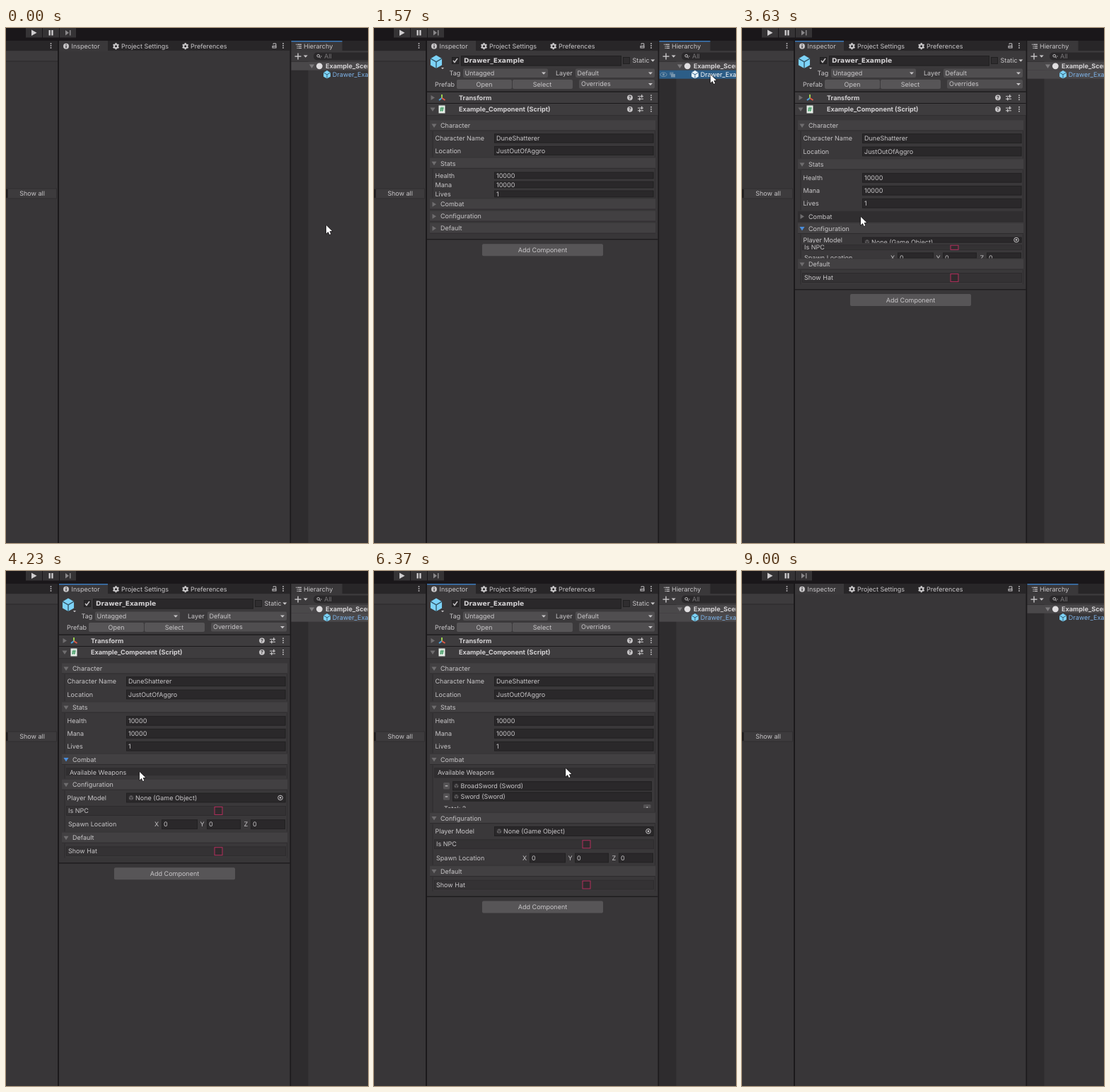
Animation, 512 px wide and 728 px high, one loop 9.43 s. Source, as an HTML page with a canvas:

```html
<!DOCTYPE html>
<html lang="en">
<head>
<meta charset="utf-8">
<title>Inspector foldouts</title>
<style>
html, body { margin: 0; width: 100%; height: 100%; overflow: hidden; background: #383638; }
canvas { display: block; width: 512px; height: 728px; }
</style>
</head>
<body>
<canvas id="stage"></canvas>
<script>
const LOOP = 9430, W = 512, H = 728;
const canvas = document.getElementById('stage');
const ctx = canvas.getContext('2d');
const dpr = window.devicePixelRatio || 1;
canvas.width = W * dpr;
canvas.height = H * dpr;

const C = {
  bg: '#383638', bar: '#1a171a', tabs: '#282628', line: '#1b191b', field: '#2a282a',
  edge: '#212021', head: '#424042', hover: '#302e30', popup: '#504e50', button: '#575557',
  text: '#c8c6c8', dim: '#8a888a', blue: '#3a79bb', select: '#2c5d87', pink: '#b5305f',
  cube: '#7dd3f8'
};
const REG = '9px Inter, sans-serif';
const BOLD = 'bold 9.1px Inter, sans-serif';
const NAME = 'bold 9.1px "DejaVu Sans", sans-serif';

// Moments of the clicks
const T = { pick: 930, show: 1000, def: 2850, config: 3350, combat: 3900, list: 4870, unlist: 6250, clear: 7560, hide: 8170 };

const PATH = [
  [0, 453, 279], [60, 453, 279], [900, 476, 66], [2000, 476, 66], [2750, 140, 299],
  [2930, 140, 299], [3260, 150, 283], [3420, 150, 283], [3600, 168, 267], [3900, 169, 268],
  [4230, 189, 284], [4640, 200, 285], [4900, 200, 285], [5470, 305, 290], [5670, 271, 285],
  [5890, 271, 285], [6070, 271, 279], [6350, 271, 279], [6930, 326, 260], [7190, 433, 167],
  [7480, 493, 157], [7960, 493, 157], [8150, 479, 145]
];

const clamp = v => Math.max(0, Math.min(1, v));
const ease = v => (1 - Math.cos(Math.PI * clamp(v))) / 2;
const ramp = (t, from, len) => ease((t - from) / len);

function cursorAt(t) {
  const i = PATH.findIndex(p => p[0] > t);
  if (i < 0) return PATH[PATH.length - 1].slice(1);
  const [a, ax, ay] = PATH[i - 1], [b, bx, by] = PATH[i];
  const k = ease((t - a) / (b - a));
  return [ax + (bx - ax) * k, ay + (by - ay) * k];
}

function box(x, y, w, h, fill, stroke) {
  ctx.fillStyle = fill;
  ctx.fillRect(x, y, w, h);
  if (stroke) {
    ctx.strokeStyle = stroke;
    ctx.lineWidth = 1;
    ctx.strokeRect(x + .5, y + .5, w - 1, h - 1);
  }
}

function rounded(x, y, w, h, r, fill) {
  ctx.fillStyle = fill;
  ctx.beginPath();
  ctx.roundRect(x, y, w, h, r);
  ctx.fill();
}

function label(s, x, cy, color = C.text, font = REG, align = 'left') {
  ctx.font = font;
  ctx.fillStyle = color;
  ctx.textAlign = align;
  ctx.fillText(s, x, cy + 3.2);
}

function poly(points, fill) {
  ctx.fillStyle = fill;
  ctx.beginPath();
  points.forEach(([x, y]) => ctx.lineTo(x, y));
  ctx.closePath();
  ctx.fill();
}

function path(points, color, width = 1) {
  ctx.strokeStyle = color;
  ctx.lineWidth = width;
  ctx.beginPath();
  points.forEach(([x, y]) => ctx.lineTo(x, y));
  ctx.stroke();
}

function disc(x, y, r, fill) {
  ctx.fillStyle = fill;
  ctx.beginPath();
  ctx.arc(x, y, r, 0, 7);
  ctx.fill();
}

function ring(x, y, r, color, width = 1) {
  ctx.strokeStyle = color;
  ctx.lineWidth = width;
  ctx.beginPath();
  ctx.arc(x, y, r, 0, 7);
  ctx.stroke();
}

function clipped(x, y, w, h, draw) {
  if (h <= 0) return;
  ctx.save();
  ctx.beginPath();
  ctx.rect(x, y, w, h);
  ctx.clip();
  draw();
  ctx.restore();
}

const caret = (x, y, c = C.text, r = 3) => poly([[x - r, y - r / 2], [x + r, y - r / 2], [x, y + r / 2 + .3]], c);
const dots = (x, y) => [-3, 0, 3].forEach(d => box(x - .8, y + d - .8, 1.6, 1.6, C.text));

function arrow(x, y, open, color = '#6f6d6f') {
  poly(open ? [[x - 3.5, y - 2.5], [x + 3.5, y - 2.5], [x, y + 3]]
            : [[x - 2.5, y - 3.5], [x + 3, y], [x - 2.5, y + 3.5]], color);
}

function cube(x, y, r, fill, seam, width) {
  const hex = [0, 1, 2, 3, 4, 5].map(i => {
    const a = Math.PI / 3 * i - Math.PI / 2;
    return [x + r * Math.cos(a), y + r * Math.sin(a)];
  });
  poly(hex, fill);
  [1, 3, 5].forEach(i => path([[x, y], hex[i]], seam, width));
}

function gear(x, y) {
  for (let i = 0; i < 3; i++) {
    const a = Math.PI / 3 * i + Math.PI / 6, dx = 4.6 * Math.cos(a), dy = 4.6 * Math.sin(a);
    path([[x - dx, y - dy], [x + dx, y + dy]], C.text, 2.2);
  }
  disc(x, y, 3.5, C.text);
  disc(x, y, 1.5, C.tabs);
}

function tabLine(x, w) { box(x, 18, w, 1.5, C.blue); }

function drawTopAndLeft() {
  box(0, 0, W, 18, C.bar);
  [28, 52, 76].forEach(x => box(x, 0, 23, 13.5, '#353335'));
  poly([[36, 2.5], [43.5, 6.7], [36, 11]], '#d0ced0');
  box(60.5, 3, 2.3, 7.5, '#d0ced0');
  box(64.3, 3, 2.3, 7.5, '#d0ced0');
  poly([[84, 3], [89, 6.7], [84, 10.5]], C.dim);
  box(90, 3, 1.5, 7.5, C.dim);

  box(0, 18, 73, 14, C.tabs);
  dots(63.5, 25);
  box(0, 33, 73, 14, '#3d3b3d');
  box(0, 46.5, 73, 1, '#2a282a');
  box(0, 226.5, 72, 15, '#3d3b3d', '#2f2d2f');
  box(0, 228, 2.5, 12, C.line);
  label('Show all', 37, 233.5, C.text, REG, 'center');
  box(73, 18, 2, 710, C.line);
  box(401.5, 18, 2, 710, C.line);
}

function drawTabs(focus) {
  box(75, 18, 326.5, 14, C.tabs);
  box(75, 18, 69, 15, '#3a383a');
  if (focus) tabLine(75, 69);
  disc(85, 25.7, 4, C.text);
  box(84.4, 25, 1.3, 3.2, C.bg);
  box(84.4, 23, 1.3, 1.2, C.bg);
  label('Inspector', 92.5, 25.7);
  gear(155.5, 25.7);
  label('Project Settings', 163, 25.7);
  gear(253.7, 25.7);
  label('Preferences', 261, 25.7);
  box(376.5, 25, 6, 3.5, C.bg, C.text);
  path([[381.8, 25], [381.8, 22], [378, 22], [378, 23.3]], C.text);
  dots(392, 25);
}

function drawHierarchy(s) {
  const active = s.picked && !s.focus;
  const over = s.cx > 403 && s.cy >= 60 && s.cy < 72;
  box(403.5, 18, 109, 14, C.tabs);
  box(403.5, 18, 72, 15, '#3a383a');
  if (!s.focus) tabLine(403.5, 72);
  [22.7, 25.3, 27.9].forEach((y, i) => {
    box(410 + (i ? 1.5 : 0), y, 1.2, 1.2, C.text);
    box(412 + (i ? 1.5 : 0), y, i ? 4.5 : 6, 1.2, C.text);
  });
  label('Hierarchy', 421, 25.7);
  box(403.5, 33, 109, 14.5, '#3c3a3c');
  box(408.5, 39.4, 9, 1.4, C.text);
  box(412.3, 35.6, 1.4, 9, C.text);
  caret(423.7, 40);
  rounded(435, 34.5, 90, 11, 5, C.field);
  ring(441.7, 39.3, 1.8, C.text);
  path([[443, 40.6], [445, 42.4]], C.text);
  caret(445.8, 40.2, C.dim, 1.3);
  label('All', 450, 40, '#7b797b');
  box(403.5, 47.5, 24, 681, '#2e2c2e');
  box(403.5, 48, 109, 11.7, '#4a484a');
  if (s.picked) box(403.5, 59.7, 109, 12, active ? C.select : '#4a484a');
  else if (over) box(403.5, 59.7, 109, 12, '#434143');
  arrow(432.5, 54, true, '#7d7b7d');
  disc(443.3, 53.8, 4.4, '#e0dee0');
  label('Example_Scene', 452, 53.8, '#d4d2d4', BOLD);
  cube(454, 65.8, 5.7, active ? '#e8f4fb' : C.cube, active ? C.select : '#2f5468', .9);
  label('Drawer_Example', 461.8, 65.8, active ? '#fff' : '#7fb4ea');
  if (over) {
    const tone = '#7795ad';
    ctx.strokeStyle = tone;
    ctx.lineWidth = 1;
    ctx.beginPath();
    ctx.ellipse(409.5, 65.8, 4.5, 2.7, 0, 0, 7);
    ctx.stroke();
    disc(409.5, 65.8, 1.5, tone);
    box(420, 65, 6, 4.5, tone);
    [418.5, 420.3, 422.1].forEach(x => box(x, 62.5, 1.2, 4, tone));
  }
}

function popup(x, y, w, s, tx) {
  rounded(x, y, w, 12.5, 2, C.popup);
  label(s, tx, y + 6);
  caret(x + w - 6, y + 6.4);
}

function headTools(y) {
  disc(362, y, 3.9, C.text);
  label('?', 362, y - .6, C.bg, 'bold 7px Inter, sans-serif', 'center');
  box(373, y - 2.2, 8, 1, C.text);
  box(373, y + 1.5, 8, 1, C.text);
  box(378, y - 4, 1.4, 4.2, C.text);
  box(375, y - .2, 1.4, 4.2, C.text);
  dots(392, y);
}

function drawObjectHeader() {
  box(75, 33, 326.5, 56.5, '#3b393b');
  cube(88, 47.8, 9.3, C.cube, '#34586a', 1.4);
  caret(97, 57, C.text, 2);
  box(110, 41, 10, 10, C.field, C.edge);
  path([[112, 46], [114, 48.5], [118, 43]], C.text, 1.4);
  box(123, 39, 227, 14.5, C.field, C.edge);
  label('Drawer_Example', 127, 46, '#d4d2d4', NAME);
  box(352, 41, 10, 10, '#2f2d2f', C.edge);
  label('Static', 365.5, 46);
  caret(394.3, 46);
  label('Tag', 106.5, 63.5);
  popup(126, 57.5, 120, 'Untagged', 128.5);
  label('Layer', 257, 63.7);
  popup(285, 57.5, 112, 'Default', 287.5);
  label('Prefab', 86, 79.5);
  rounded(117, 73, 78, 13, 2, C.button);
  label('Open', 156, 79.5, C.text, REG, 'center');
  rounded(196, 73, 85, 13, 2, C.button);
  label('Select', 238, 79.5, C.text, REG, 'center');
  popup(290, 73, 107, 'Overrides', 293);

  box(75, 89.5, 326.5, 1.3, C.line);
  box(75, 91, 326.5, 15, '#3e3c3e');
  arrow(83, 98.5, false);
  path([[96, 99], [96, 94]], '#9ad04f', 2);
  path([[96, 99], [92, 102]], '#4aa3e0', 2);
  path([[96, 99], [100.5, 102]], '#e05a45', 2);
  label('Transform', 120, 98.5, '#d4d2d4', BOLD);
  headTools(98.3);
  box(75, 106, 326.5, 1, C.line);
  box(75, 107, 326.5, 16, '#3e3c3e');
  arrow(83, 115, true);
  box(91.5, 109.5, 9, 11, '#e4ece6');
  label('#', 96, 115, '#2f9255', 'bold 9px Inter, sans-serif', 'center');
  label('Example_Component (Script)', 120, 115, '#d4d2d4', BOLD);
  headTools(114.8);
  box(75, 123, 326.5, 1, '#302e30');
}

function check(cy, h) {
  const s = Math.max(0, Math.min(12, h));
  box(294.5, cy - s / 2, 12, s, '#302a2d', C.pink);
}

function darkRow(s, cy, h) {
  const on = Math.abs(s.cy - cy) < h / 2 && s.cx > 85 && s.cx < 396;
  box(85, cy - h / 2, 311, h, on ? C.hover : '#343234', '#2d2b2d');
}

// Rows receive the state, centre and height
const textRow = (name, value) => (s, cy, h) => {
  label(name, 86.5, cy);
  box(170, cy - h / 2, 225.5, h, C.field, C.edge);
  label(value, 173, cy);
};
const checkRow = name => (s, cy, h) => {
  darkRow(s, cy, h);
  label(name, 88, cy);
  check(cy, h - 1);
};
function objectRow(s, cy, h) {
  const ty = cy - h / 2 + 7;
  label('Player Model', 86.5, cy);
  box(170, cy - h / 2, 225.5, h, C.field, C.edge);
  cube(177, ty, 3.6, '#5d5b5d', C.field, .8);
  label('None (Game Object)', 183, ty);
  ring(388, cy, 3.3, C.text);
  disc(388, cy, 1.3, C.text);
}
function vectorRow(s, cy, h) {
  const ty = cy - h / 2 + 7;
  label('Spawn Location', 88, ty);
  [['X', 210, 220, 51], ['Y', 274.5, 284, 48], ['Z', 336.5, 346, 49]].forEach(([axis, x, fx, w]) => {
    label(axis, x, ty);
    box(fx, cy - h / 2, w, h, C.field, C.edge);
    label('0', fx + 3, ty);
  });
}

const GROUPS = [
  { name: 'Character', size: 38, rows: [[18.2, textRow('Character Name', 'DuneShatterer')], [36.5, textRow('Location', 'JustOutOfAggro')]] },
  { name: 'Stats', size: 56.5, rows: [[18.7, textRow('Health', '10000')], [36.7, textRow('Mana', '10000')], [54.7, textRow('Lives', '1')]] },
  { name: 'Combat', size: 24 },
  { name: 'Configuration', size: 58, rows: [[18.3, objectRow], [36.7, checkRow('Is NPC')], [56, vectorRow]] },
  { name: 'Default', size: 20, rows: [[19, checkRow('Show Hat')]] }
];
const LIST = 48.8;

function drawWeapons(s, y, k) {
  const over = s.cx > 85 && s.cx < 396 && Math.abs(s.cy - y - 18.7) < 8;
  clipped(80, y + 11.5, 320, 14.5 * k, () => {
    box(85, y + 11.5, 311, 14.5, over ? C.hover : '#403e40', '#2f2d2f');
    label('Available Weapons', 90, y + 18.7);
  });
  clipped(80, y + 26.5, 320, LIST * s.list, () => {
    box(95, y + 27, 300, 49, '#3a383a');
    ['BroadSword (Sword)', 'Sword (Sword)'].forEach((name, i) => {
      const cy = y + 37.3 + i * 15.2;
      rounded(98, cy - 4.7, 9, 9.4, 1.5, '#545254');
      box(100.7, cy - .6, 3.6, 1.2, C.text);
      box(111, cy - 6.5, 282, 13, C.field, C.edge);
      cube(116.5, cy, 3.3, '#5d5b5d', C.field, .8);
      label(name, 122.5, cy);
    });
    label('Total: 2', 99, y + 69);
    rounded(381, y + 63.5, 10.5, 11, 1.5, '#545254');
    box(384, y + 68.4, 4.6, 1.2, C.text);
    box(385.7, y + 66.7, 1.2, 4.6, C.text);
  });
}

function drawGroups(s) {
  let y = 138;
  GROUPS.forEach((g, i) => {
    const k = s.open[i];
    const size = g.size * k + (i === 2 ? LIST * s.list : 0);
    const over = s.cx > 79 && s.cx < 398 && Math.abs(s.cy - y) < 7.5;
    if (size > 1) {
      box(82.5, y + 8, 314.5, size, '#3a383a');
      box(82.5, y + 8, 1, size, '#2c2a2c');
      box(397, y + 8, 1, size, '#302e30');
    }
    if (i === 2) drawWeapons(s, y, k);
    else if (k > .02) g.rows.forEach(([off, row]) => {
      const cy = y + 13 + k * (off - 13), h = 14 * k;
      clipped(80, cy - h / 2, 320, h, () => row(s, cy, h));
    });
    box(79, y - 7.5, 319, 15, over ? C.hover : C.head);
    box(79, y + 6.5, 319, 1, '#2d2b2d');
    arrow(85, y, k > 0, s.last === i ? '#4b8ddb' : '#6f6d6f');
    label(g.name, 94, y);
    y += 17 + size;
  });
  const end = y - 2;
  box(75, end, 326.5, 1.3, C.line);
  rounded(153, end + 7, 171, 17, 2, C.button);
  label('Add Component', 238.5, end + 15.5, C.text, REG, 'center');
}

function drawCursor(x, y) {
  const shape = [[0, 0], [0, 11.5], [2.7, 9], [4.6, 13], [6.4, 12.2], [4.6, 8.3], [8.2, 8]];
  const pts = shape.map(([a, b]) => [x + a, y + b]);
  path([...pts, pts[0]], '#1a181a', 1.2);
  poly(pts, '#fff');
}

function stateAt(t) {
  const [cx, cy] = cursorAt(t);
  const clicks = [[T.def, 4], [T.config, 3], [T.combat, 2], [T.list, -1]];
  const last = clicks.reduce((v, [at, i]) => t >= at ? i : v, -1);
  return {
    cx, cy, last,
    picked: t >= T.pick && t < T.clear,
    shown: t >= T.show && t < T.clear,
    focus: t >= T.def && t < T.clear,
    open: [ramp(t, 1000, 660), ramp(t, 1060, 790), ramp(t, T.combat, 480), ramp(t, T.config, 510), ramp(t, T.def, 480)],
    list: ramp(t, T.list, 500) - ramp(t, T.unlist, 500)
  };
}

function draw(t) {
  const s = stateAt(t);
  ctx.setTransform(dpr, 0, 0, dpr, 0, 0);
  ctx.textRendering = 'geometricPrecision';
  box(0, 0, W, H, C.bg);
  drawTopAndLeft();
  drawTabs(s.focus);
  drawHierarchy(s);
  if (s.shown) {
    drawObjectHeader();
    drawGroups(s);
  }
  if (t < T.hide) drawCursor(s.cx, s.cy);
}

const start = performance.now();
function tick() {
  draw((performance.now() - start) % LOOP);
  requestAnimationFrame(tick);
}
tick();
</script>
</body>
</html>
```
